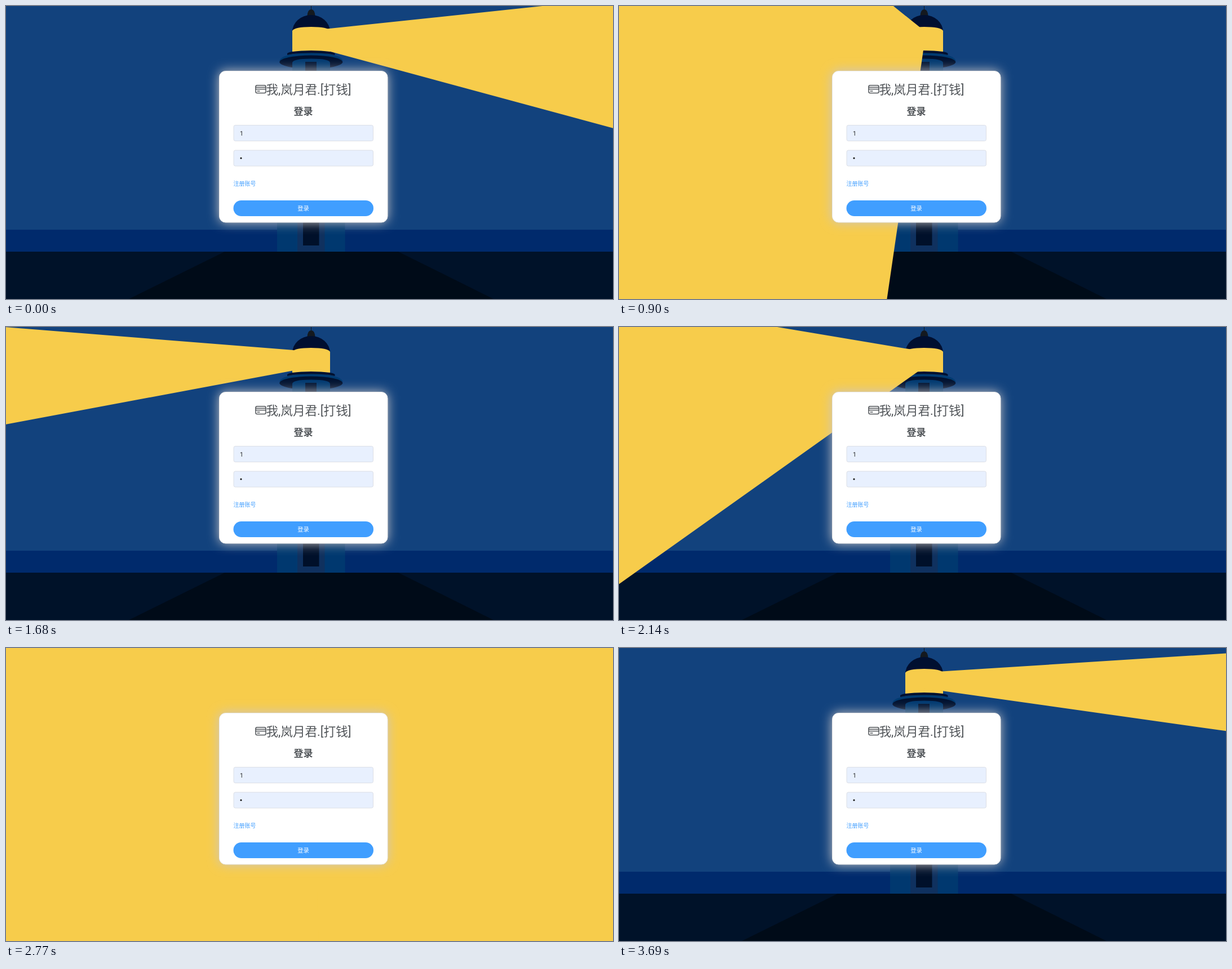
An HTML page that plays this animation: 1077 px wide and 520 px high, repeating every 3.77 s.

```html
<!DOCTYPE html>
<html lang="zh-CN">
<head>
<meta charset="utf-8">
<title>登录</title>
<style>
  html, body { margin: 0; width: 100%; height: 100%; overflow: hidden; background: #12427d; }
  svg { display: block; width: 1077px; height: 520px; }
  text { font-family: Roboto, "Noto Sans CJK SC", "Noto Sans CJK", sans-serif; fill: #505458; }
  .mid { text-anchor: middle; }
  .field { fill: #e8f0fe; stroke: #dcdfe6; }
  .icon { fill: none; stroke: #505458; stroke-width: 1.5; stroke-linecap: round; }
</style>
</head>
<body>
<svg viewBox="0 0 1077 520" xmlns="http://www.w3.org/2000/svg">
  <defs>
    <filter id="blur" x="-20%" y="-20%" width="140%" height="140%">
      <feGaussianBlur stdDeviation="10"/>
    </filter>
  </defs>

  <!-- landscape -->
  <rect width="1077" height="520" fill="#12427d"/>
  <rect y="397" width="1077" height="39" fill="#002a6c"/>
  <rect y="436" width="1077" height="84" fill="#001229"/>
  <path d="M388 436H696L865 520H218Z" fill="#000b18"/>

  <!-- lighthouse -->
  <ellipse cx="541.3" cy="97" rx="56" ry="14" fill="#003a70"/>
  <ellipse cx="541.3" cy="99.5" rx="56" ry="12" fill="#001130"/>
  <path d="M508 101Q508 93.500 541.500 93.500T575 101V130L601.500 384V436H481V384L508 130Z" fill="#00386f"/>
  <rect x="531" y="99" width="20" height="30" fill="#001433"/>
  <rect x="517" y="384" width="48.500" height="52" fill="#0f315f"/>
  <rect x="527" y="384" width="28.500" height="41" fill="#00102a"/>
  <path d="M499 84Q505 79 541.300 79T583.500 84V87Q570 83.500 541.300 83.500T499 87Z" fill="#001130"/>
  <path d="M541.500 0V8" stroke="#14191f"/>
  <path d="M534.500 18Q535 6 541.500 6T548.500 18Z" fill="#14191f"/>
  <path d="M508 46A33.500 30 0 0 1 575 46Z" fill="#000f30"/>
  <path d="M508 44Q512 37 541.500 37T575 44V81Q560 79 541.500 79T508 81Z" fill="#f7cc4b"/>

  <!-- light -->
  <rect id="flash" width="1077" height="520" fill="#f7cc4b" opacity="0"/>
  <path id="beam" fill="#f7cc4b"/>

  <!-- login card -->
  <rect x="378" y="115" width="299" height="269" rx="11" fill="#cac6c6" filter="url(#blur)"/>
  <rect x="378.500" y="115.500" width="298.500" height="268.500" rx="11" fill="#fff" stroke="#eaeaea"/>
  <g class="icon">
    <rect x="443" y="140.700" width="18" height="13.800" rx="2.500"/>
    <path d="M443 144.300H461M443 147.500H461M446 151H450"/>
  </g>
  <text x="461.500" y="156" font-size="21.600">我,岚月君.[打钱]</text>
  <text class="mid" x="527.500" y="193" font-size="17" font-weight="700">登录</text>
  <rect class="field" x="404" y="211.500" width="247.500" height="28" rx="3"/>
  <rect class="field" x="404" y="256" width="247.500" height="28" rx="3"/>
  <text x="415" y="229.500" font-size="10.500" style="fill:#222">1</text>
  <circle cx="417" cy="270" r="1.600" fill="#111"/>
  <text x="403.500" y="319" font-size="10" style="fill:#409eff">注册账号</text>
  <rect x="403.500" y="345" width="248.500" height="28" rx="14" fill="#409eff"/>
  <text class="mid" x="527.500" y="362.500" font-size="10.300" style="fill:#fff">登录</text>
</svg>
<script>
const LOOP = 3770;
const AXIS = { x: 541, top: 43.6, bottom: 71.5 };
// Steps at which the beam points straight at the viewer.
const FRONT = [10.39, 35.66];
// [steps from front, lower slope * steps, upper slope * steps]
const SPREAD = [
  [0, 11.2, 1.27], [1.5, 11.1, 1.29], [4.34, 8.78, 1.384], [7.4, 5.7, 1.3],
  [10.39, 2.816, 1.103], [11.61, 2.171, 0.929], [12.34, 1.745, 0.785], [12.64, 1.58, 0.72]
];
const flash = document.getElementById("flash");
const beam = document.getElementById("beam");
const clamp = v => Math.max(0, Math.min(1, v));

// The light moves in discrete steps, slightly quicker at the start.
const stepAt = t => t < 660 ? Math.floor(t * 9 / 660) : 9 + Math.floor((t - 655) / 77.65);

function spreadAt(gap) {
  const i = Math.max(1, SPREAD.findIndex(p => p[0] >= gap));
  const a = SPREAD[i - 1], b = SPREAD[i];
  const k = clamp((gap - a[0]) / (b[0] - a[0]));
  return [1, 2].map(j => (a[j] + (b[j] - a[j]) * k) / gap);
}

function draw(t) {
  const step = Math.min(48, stepAt(t));
  const leftTurn = (FRONT[0] + FRONT[1]) / 2;
  const offset = step - (step < leftTurn ? FRONT[0] : FRONT[1]);
  const side = step > FRONT[0] && step < FRONT[1] ? -1 : 1;
  const [down, up] = spreadAt(Math.min(12.63, Math.abs(offset)));
  const reach = 700, { x, top, bottom } = AXIS;
  const far = x + side * reach;
  beam.setAttribute("d",
    `M${x} ${top}L${far} ${top - up * reach}V${bottom + down * reach}L${x} ${bottom}Z`);
  flash.setAttribute("opacity", Math.min(clamp((offset + 1.74) / 0.56), clamp((1.5 - offset) / 0.6)));
}

const start = performance.now();
function tick() {
  draw((performance.now() - start) % LOOP);
  requestAnimationFrame(tick);
}
tick();
</script>
</body>
</html>
```
